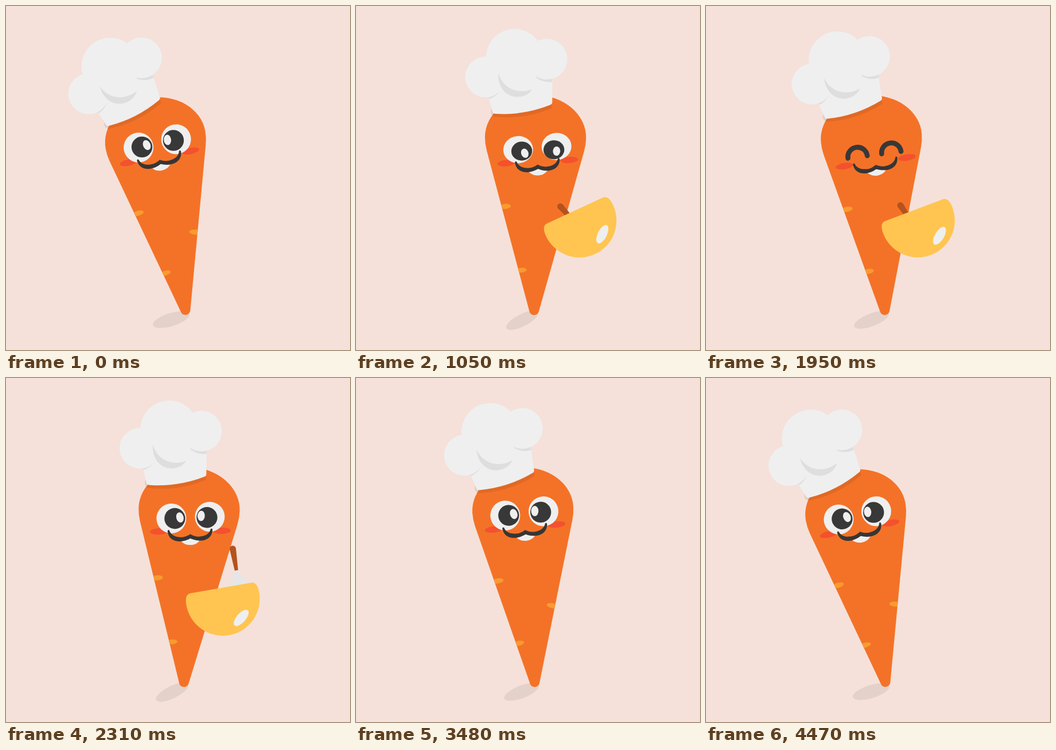
An HTML page with a canvas that plays this animation: 600x600 px, repeating every 4.5 s.

```html
<!DOCTYPE html>
<html lang="en">
<head>
<meta charset="utf-8">
<title>Carrot chef</title>
<style>
html, body { margin: 0; width: 100%; height: 100%; overflow: hidden; background: #f5e1da; }
canvas { display: block; width: 100%; height: 100%; }
</style>
</head>
<body>
<canvas id="stage" width="600" height="600"></canvas>
<script>
const ctx = document.getElementById('stage').getContext('2d');
const LOOP = 4500, STIR = 915;
const WHITE = '#efefef', DARK = '#383838', SHADE = '#dedede';
const rad = deg => deg * Math.PI / 180;
const linear = p => p;
const ease = p => p ** 1.8 / (p ** 1.8 + (1 - p) ** 1.8);

// Keys are [time, ...values]; returns the interpolated values.
function track(keys, t, curve = ease) {
  if (t <= keys[0][0]) return keys[0].slice(1);
  const i = keys.findIndex(key => key[0] > t);
  if (i < 0) return keys[keys.length - 1].slice(1);
  const from = keys[i - 1], to = keys[i];
  const p = curve((t - from[0]) / (to[0] - from[0]));
  return from.slice(1).map((v, j) => v + (to[j + 1] - v) * p);
}

const tiltKeys = [[0, -10], [885, 2.1], [1515, -10], [2430, 2.1], [3030, -10], [3930, 2.1], [LOOP, -10]];
const hatKeys = [[0, -7.3], [1020, .2], [1590, -6.4], [2520, .2], [3090, -6.4], [4020, .2], [LOOP, -7.3]];
const nodKeys = [[600, 0], [960, 1], [2200, 1], [2460, 0]];
const lidKeys = [[1015, 1], [1140, .45], [2130, .45], [2220, 1]];
const bowlKeys = [[1050, 71, -159, -25.4], [1530, 72, -159.4, -22.3], [2310, 60, -150.7, -11.6], [2760, 54.8, -160.5, -6.4]];
const bowlSizeKeys = [[150, 0], [330, 1.15], [480, 1], [2580, 1], [2720, 1.18], [2770, 1.18], [2970, 0]];
const whiskKeys = [[0, 32, -67, 0], [135, 57, -25, 40], [450, -12, -12, 11], [570, -20, -20, -17], [STIR, 32, -67, 0]];

function place(x, y, deg, draw, sx = 1, sy = sx) {
  ctx.save();
  ctx.translate(x, y);
  ctx.rotate(rad(deg));
  ctx.scale(sx, sy);
  draw();
  ctx.restore();
}

function oval(x, y, rx, ry, color, deg = 0) {
  ctx.beginPath();
  ctx.ellipse(x, y, rx, ry, rad(deg), 0, 7);
  ctx.fillStyle = color;
  ctx.fill();
}

function shape(path, color) {
  ctx.fillStyle = color;
  ctx.fill(new Path2D(path));
}

function body() {
  const half = rad(15.3);
  ctx.save();
  ctx.beginPath();
  ctx.ellipse(0, -289, 88.2, 73.6, 0, Math.PI, 2 * Math.PI);
  ctx.arc(0, -289, 88.2, 0, half);
  ctx.arc(0, 12.5, 8.5, half, Math.PI - half);
  ctx.arc(0, -289, 88.2, Math.PI - half, Math.PI);
  ctx.fillStyle = '#f47227';
  ctx.fill();
  ctx.clip();
  oval(-52, -168, 10, 4.4, '#f89b2f', -6);
  oval(-23.5, -57, 10, 4.2, '#f89b2f', -6);
  oval(40.5, -118.3, 10.5, 4.4, '#f89b2f', 14);
  ctx.restore();
}

function openEye(x, y, lid, pupil, glint, lean) {
  place(x, y, 0, () => {
    oval(0, 0, 26, 26, WHITE);
    oval(...pupil, 18.2, 18.2, DARK);
    oval(pupil[0] + glint[0], pupil[1] + glint[1], 6.4, 9, WHITE, lean);
  }, 1, lid);
}

function happyEye(x, y) {
  ctx.beginPath();
  ctx.arc(x, y, 17, rad(182), rad(362));
  ctx.lineWidth = 8.6;
  ctx.lineCap = 'round';
  ctx.strokeStyle = DARK;
  ctx.stroke();
}

function halfMoustache() {
  shape('M.3-4.5C-8 .5-14 1-20 0C-28-1-34-5-36-12C-37-14-40-13-39-9C-37 4-26 7.5-18 7.5C-10 7.5-4 5 .3 3Z', '#363636');
}

function face(lid, gaze) {
  oval(-54.5, -11, 15.3, 5.5, '#f4512e');
  oval(55.8, -8.3, 15.3, 5.5, '#f4512e');
  if (lid > .5) {
    openEye(-31.8, -33, lid, [6, .3 + 3 * gaze], [9 - 4 * gaze, -1.5 + 6 * gaze], -12);
    openEye(35.3, -33.5, lid, [-5, 1 + 5 * gaze], [-10 + 14.5 * gaze, -3 + 6 * gaze], 6);
  } else {
    happyEye(-29, -23);
    happyEye(30.3, -21);
  }
  ctx.beginPath();
  ctx.ellipse(0, 2, 17.5, 12.5, 0, 0, Math.PI);
  ctx.fillStyle = WHITE;
  ctx.fill();
  halfMoustache();
  place(0, 0, 0, halfMoustache, -1, 1);
}

function hat() {
  const band = 'M230 155L238 185Q239 188 243 188Q292 191 339 172Q342.5 170.5 342 166V125L275 90Z';
  shape('M236 179Q232 189 240 193Q292 199 341 178V160H245Z', 'rgba(0,0,0,.08)');
  shape(band, WHITE);
  ctx.save();
  ctx.clip(new Path2D(band));
  oval(222, 128, 35.5, 35.5, SHADE);
  oval(336, 97, 35.5, 35.5, SHADE);
  ctx.restore();
  oval(225.5, 124, 35.5, 35.5, WHITE);
  oval(332.5, 92.5, 35.5, 35.5, WHITE);
  oval(276, 90, 50, 50, WHITE);
  shape('M248 117C246 142 262 159 282 158.5C293 158 302 153 307 145C285 154 256 146 248 117Z', SHADE);
}

function whisk() {
  shape('M-3 36Q-7 52-22 66Q-24 76 0 77Q24 76 22 66Q7 52 3 36Z', '#e6e6e6');
  shape('M-5.5 0A5.5 5.5 0 0 1 5.5 0L3 38H-3Z', '#b4531d');
}

function bowl(t) {
  const [x, y, deg] = track(whiskKeys, (t - 480 + STIR) % STIR, linear);
  place(x, y, deg, whisk);
  shape('M-54-3H54C62-3 64.5 6 64.5 16A64.5 64.5 0 0 1-64.5 16C-64.5 6-62-3-54-3Z', '#ffc550');
  oval(26, 54.5, 8, 17.5, WHITE, 51);
}

function character(t) {
  const [hatTurn] = track(hatKeys, t);
  const [nod] = track(nodKeys, t);
  const [lid] = track(lidKeys, t);
  const gaze = t < 1600 ? nod : 0;
  body();
  place(1.6 + 2.8 * nod, -249 + 12 * nod, -2 - 2.8 * nod, () => face(lid, gaze));

  // The hat is drawn in stage coordinates and turns on its own pivot.
  ctx.save();
  ctx.rotate(rad(-.43));
  ctx.translate(-310.8, -518);
  place(258, 225, hatTurn, () => {
    ctx.translate(-258, -225);
    hat();
  });
  ctx.restore();

  const [size] = track(bowlSizeKeys, t);
  if (size > 0) {
    const [x, y, deg] = track(bowlKeys, t);
    place(x, y, deg, () => bowl(t), size);
  }
}

function draw(t) {
  ctx.fillStyle = '#f5e1da';
  ctx.fillRect(0, 0, 600, 600);
  const lift = (track(hatKeys, t)[0] + 7.3) / 7.5;
  oval(288 + 2 * lift, 547 + lift, 33.3 - 2.3 * lift, 11.4 - .7 * lift, '#e3d1ca', -17 - 10 * lift);
  place(310.8, 518, track(tiltKeys, t)[0], () => character(t));
}

const start = performance.now();
function tick() {
  draw((performance.now() - start) % LOOP);
  requestAnimationFrame(tick);
}
tick();
</script>
</body>
</html>
```
